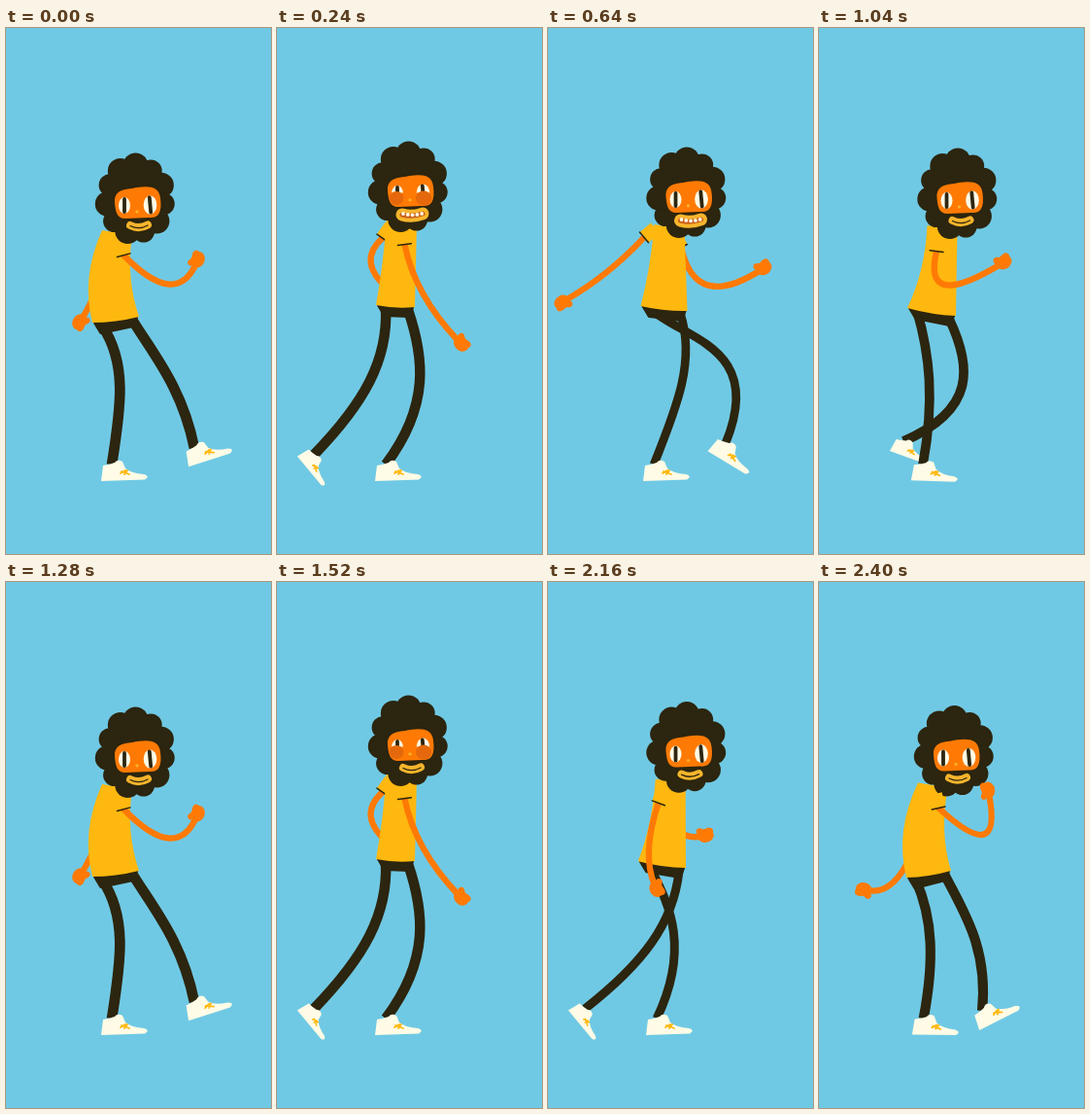
Write an HTML page with a canvas that moves like this. It is 273 px wide and 541 px high and loops after 2560 ms.

```html
<!DOCTYPE html>
<html lang="en">
<head>
<meta charset="utf-8">
<title>Walk cycle</title>
<style>
  html, body { margin: 0; width: 100%; height: 100%; overflow: hidden; background: #70c9e4; }
  canvas { display: block; width: 273px; height: 541px; }
</style>
</head>
<body>
<canvas id="stage"></canvas>
<script>
const W = 273, H = 541, STEP = 80, LOOP = 2560, CYCLE = 16, TAU = Math.PI * 2;
const SKY = '#70c9e4', DARK = '#2c250f', SHIRT = '#ffb80f', SKIN = '#ff7a05',
      CREAM = '#fffbe6', CHEEK = '#e5690c', LIP = '#f7b52c', MOUTH = '#c9601a';

const canvas = document.getElementById('stage');
const dpr = window.devicePixelRatio || 1;
canvas.width = W * dpr;
canvas.height = H * dpr;
const ctx = canvas.getContext('2d');

// Key poses; each row starts with its step in the cycle.
// head dx, dy, neck x, hem x, hem y, hem half width, hem tilt, back bow
const BODY = [
  [0, 0, 0, 114, 113, 300, 24, -3, -17],
  [3, 2, -12, 128, 122, 286, 20, 1, 2],
  [8, 9.5, -6, 124.5, 119.5, 288.5, 24, 2.5, 3],
  [13, 9.5, -5, 126.5, 116, 292, 25, 4, 8],
  [14, 6, -1.5, 117, 113, 300.5, 23, -3.5, -18]
];
// ankle x, y, foot angle, thigh bend, shin bend; both legs share it half a cycle apart
const GAIT = [
  [0, 194, 432, -16, 4, 16],
  [3, 112, 449, 0, 23, 37],
  [5, 107, 449, 4, 11, 15],
  [8, 109, 449, 0, 23, 14],
  [11, 38, 439, 52, 26, 23],
  [12, 48, 432, 44, 28, 36],
  [13, 87, 425, 22, 39, 59],
  [14, 168, 441, -25, 8, 24]
];
// sleeve angle, elbow x, y, wrist x, y
const NEAR = [
  [0, 75, 175, 289, 196, 242],
  [3, 82, 142, 275, 187, 322],
  [8, 140, 62, 255, 18, 280],
  [11, 110, 96, 280, 110, 312],
  [13, 98, 106, 292, 187, 243],
  [14, 77, 190, 294, 175, 218]
];
const FAR = [
  [0, 100, 88, 285, 78, 299],
  [3, 125, 82, 240, 114, 268],
  [8, 65, 152, 292, 219, 249],
  [13, 95, 112, 250, 118, 270],
  [14, 100, 88, 325, 50, 317]
];

function pose(rows, step) {
  const i = rows.findLastIndex(row => row[0] <= step);
  const a = rows[i], b = rows[(i + 1) % rows.length];
  const end = b[0] > a[0] ? b[0] : b[0] + CYCLE;
  const f = (step - a[0]) / (end - a[0]);
  return a.slice(1).map((v, n) => v + (b[n + 1] - v) * f);
}

function fill(path, color) {
  ctx.fillStyle = color;
  ctx.fill(new Path2D(path));
}

function stroke(path, color, width, cap = 'round') {
  ctx.strokeStyle = color;
  ctx.lineWidth = width;
  ctx.lineCap = ctx.lineJoin = cap === 'round' ? 'round' : 'miter';
  ctx.lineCap = cap;
  ctx.stroke(new Path2D(path));
}

function oval(x, y, rx, ry, color, turn = 0) {
  ctx.fillStyle = color;
  ctx.beginPath();
  ctx.ellipse(x, y, rx, ry, turn, 0, TAU);
  ctx.fill();
}

function at(x, y, degrees, scale, draw) {
  ctx.save();
  ctx.translate(x, y);
  ctx.rotate(degrees * TAU / 360);
  ctx.scale(scale, scale);
  draw();
  ctx.restore();
}

// lift (0 to 1) turns the straight forward kick into a high, bent knee.
function leg(phase, hx, hy, width, lift) {
  let [x, y, angle, thigh, shin] = pose(GAIT, phase);
  x -= 11 * lift;
  y -= 5 * lift;
  angle += 49 * lift;
  thigh += 11 * lift;
  shin += 68 * lift;

  const dx = x - hx, dy = y - hy, len = Math.hypot(dx, dy);
  const bend = (along, out) => `${hx + dx * along + dy / len * out} ${hy + dy * along - dx / len * out}`;
  stroke(`M${hx} ${hy}C${bend(0.28, thigh)} ${bend(0.58, shin)} ${x} ${y}`, DARK, width, 'butt');
  at(x, y, angle, x < 100 ? 0.85 : 1, () => {
    fill('M-9 1L-11 17L34 15.5Q40 12 33 10Q20 9 14 4L11 -3Q6 -6 3 -2Q-2 0 -9 1Z', CREAM);
    stroke('M9 9L14 6M13 10L16 6M10 7L18 10', SHIRT, 1.8);
  });
}

function arm([angle, ex, ey, x, y], neckX, neckY) {
  const a = angle * TAU / 360;
  const sx = neckX - 1 + 32 * Math.cos(a), sy = neckY - 16 + 38 * Math.sin(a);
  stroke(`M${sx} ${sy}Q${ex} ${ey} ${x} ${y}`, SKIN, 6.3);
  at(x, y, Math.atan2(y - ey, x - ex) * 360 / TAU, 1, () => {
    oval(4, 0, 8.5, 7, SKIN);
    oval(-1, -5, 4, 3.4, SKIN, 0.5);
    oval(8, -4, 4.5, 3.6, SKIN);
  });
  at(sx, sy, angle, 1, () => {
    stroke('M-15 0L0 0', SHIRT, 14, 'butt');
    stroke('M0 -7L0 7', DARK, 1.5);
  });
}

function eye(x, y, rx, ry, slant) {
  oval(x, y, rx, ry, CREAM);
  stroke(`M${x - slant} ${y - ry + 2}L${x + slant} ${y + ry - 2}`, DARK, 3.8);
}

function head(dx, dy, talking, squint) {
  at(dx, dy, 0, 1, () => {
    oval(133.5, 176, 34, 39, DARK);
    for (let i = 0; i < 11; i++) {
      const a = i / 11 * TAU, r = i % 2 ? 11.5 : 13;
      oval(133.5 + 29 * Math.sin(a), 176 - 34.5 * Math.cos(a), r, r, DARK);
    }
    fill('M112 180C111 169 118 166 130 165C143 162 158 161 159 175C161 190 157 196 147 195L123 196C114 196 113 189 112 180Z', SKIN);

    ctx.save();
    if (squint) {
      ctx.beginPath();
      ctx.rect(100, 160, 70, 21.5);
      ctx.clip();
    }
    eye(122, 182.5, 6, 8.5, 0);
    eye(148.5, 182, 6.8, 9.5, 0.7);
    ctx.restore();
    if (squint) {
      oval(121, 187, 7.5, 7, CHEEK);
      oval(149, 187, 8.2, 7.4, CHEEK);
    }
    oval(135, 189, 1.6, 1.4, LIP);

    if (talking) {
      const smile = 'M127 204Q137 207 148 203';
      stroke(smile, LIP, 13);
      stroke(smile, MOUTH, 5);
      for (let i = 0; i < 5; i++) oval(128 + i * 4.8, 203 + Math.sin(i * 0.8) * 1.3, 1.9, 1.9, CREAM);
    } else {
      stroke('M128 203Q137 207.5 146 202.5', LIP, 8);
      stroke('M128 203.5Q137 208 146 203', DARK, 1.3);
    }
  });
}

function render(now) {
  const tick = Math.min(30, Math.floor(now % LOOP / STEP));
  const step = tick % CYCLE;
  const [dx, dy, neckX, hemX, hemY, half, tilt, bow] = pose(BODY, step);
  const neckY = 213 + dy;
  const left = hemX - half, leftY = hemY - tilt, right = hemX + half, rightY = hemY + tilt;
  const width = 9.7 + 1.1 * Math.cos((step - 1) / CYCLE * TAU);
  const lift = Math.abs(step - 8) < 2 ? Math.cos((step - 8) / 8 * TAU) : 0;

  ctx.setTransform(dpr, 0, 0, dpr, 0, 0);
  ctx.fillStyle = SKY;
  ctx.fillRect(0, 0, W, H);

  arm(pose(FAR, step), neckX, neckY);
  leg(step, right - 7, rightY + 3, width, 0);
  leg((step + CYCLE / 2) % CYCLE, left + 10, leftY + 3, width, lift);

  const hips = `M${left + 3} ${leftY}L${right - 3} ${rightY}L${right - 6} ${rightY + 9}L${left + 9} ${leftY + 10}Z`;
  fill(hips, DARK);
  stroke(hips, DARK, 4);

  const midY = (neckY + hemY) / 2;
  fill(`M${neckX - 15} ${neckY - 5}Q${(neckX - 15 + left) / 2 + bow} ${midY} ${left} ${leftY}
        Q${hemX} ${hemY + 3} ${right} ${rightY}
        Q${(neckX + 16 + right) / 2 + Math.min(bow, 0) * 0.6} ${midY} ${neckX + 16} ${neckY}Z`, SHIRT);

  // A raised near hand passes over the beard.
  const near = pose(NEAR, step);
  const raised = near[4] < 235;
  if (!raised) arm(near, neckX, neckY);
  head(dx, dy, tick >= 2 && tick <= 10, step >= 2 && step <= 4);
  if (raised) arm(near, neckX, neckY);
}

function loop(now) {
  render(now);
  requestAnimationFrame(loop);
}
render(0);
requestAnimationFrame(loop);
</script>
</body>
</html>
```
